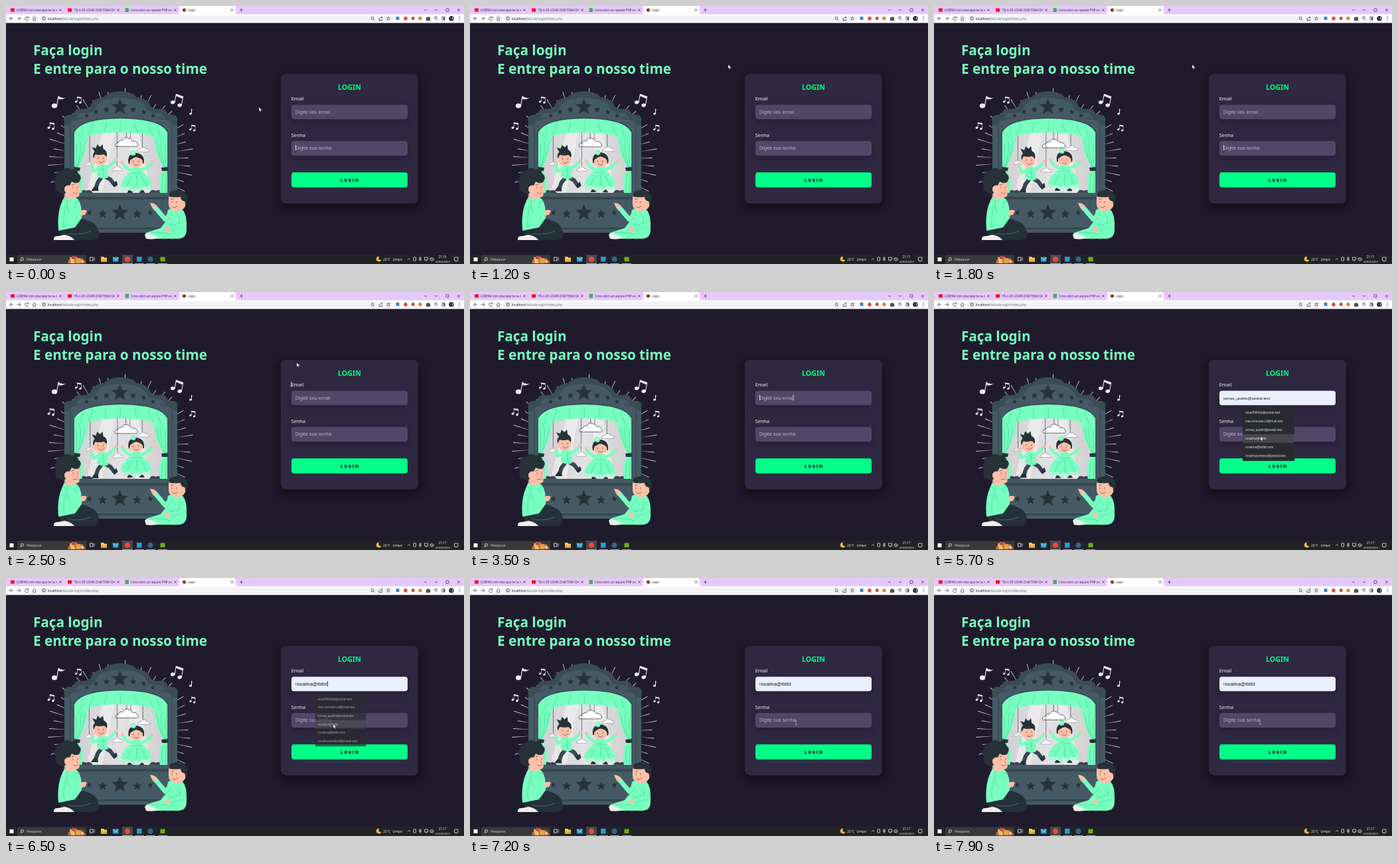
An HTML page for the animation above (8000 ms loop, 690 by 388 pixels).

```html
<!DOCTYPE html>
<html lang="pt">
<meta charset="utf-8">
<title>Login</title>
<style>
html, body { margin: 0; width: 100%; height: 100%; overflow: hidden; background: #201b2c }
svg { display: block; width: 690px; height: 388px }
text { font-family: "Noto Sans", "Open Sans", sans-serif }
.ui { font: 5px "Open Sans", "Noto Sans", sans-serif }
.tab { font: 4.5px Roboto, sans-serif; fill: #3f3547 }
.tab text { font-family: Roboto, sans-serif }
.field { font: 7.35px "Liberation Sans", Arial, sans-serif; fill: #b5aec4 }
.line { fill: none; stroke: #50535a; stroke-width: .9 }
.mint { fill: #77ffc0 } .slate { fill: #455a64 } .dark { fill: #263238 } .shade { fill: #37474f }
.skin { fill: #ffbfa8 } .pale { fill: #eee }
.fold { fill: none; stroke: #34c88b; stroke-width: .6; stroke-linecap: round }
.ink { fill: none; stroke: #263238; stroke-width: .6; stroke-linecap: round }
.limb { fill: none; stroke-linecap: round; stroke-linejoin: round }
</style>
<svg viewBox="0 0 690 388">
<defs>
  <path id="star" d="M0-10 2.6-3.6 9.5-3.1 4.2 1.4 5.9 8.1 0 4.4-5.9 8.1-4.2 1.4-9.5-3.1-2.6-3.6Z"/>
  <path id="cloud" d="M-16 5Q-19 0-12-1Q-11-5-6-4Q-2-11 4-7Q7-8 9-3Q15-4 17 1Q19 5 14 5Z" fill="#fff" stroke="#263238" stroke-width=".7"/>
  <g id="pair" fill="#eee"><ellipse cx="-6" cy="5" rx="3.3" ry="2.6" transform="rotate(-25 -6 5)"/><ellipse cx="5" cy="7.500" rx="3.3" ry="2.6" transform="rotate(-25 5 7.500)"/><path d="M-3.6 5V-8.500L8.300-6.500V8H7.300V-3L-2.600-5V5Z"/></g>
  <path id="x" d="M-1.7-1.7 1.7 1.7M1.7-1.7-1.7 1.7" class="line"/>
  <clipPath id="opening"><path d="M102 282V190Q112 169 172 168.500Q234 169 244 190V282Z"/></clipPath>
  <filter id="blur" x="-30%" y="-30%" width="160%" height="180%"><feGaussianBlur stdDeviation="6"/></filter>
  <linearGradient id="moonlight"><stop stop-color="#cfcfd1"/><stop offset=".5" stop-color="#e2e2e4"/><stop offset="1" stop-color="#cfcfd1"/></linearGradient>
</defs>
<rect width="690" height="388" fill="#201b2c"/>

<!-- browser -->
<rect width="690" height="13" fill="#e5c9fa"/>
<path d="M258 12.500Q261 12 261 9V3Q261 0 264 0H343Q346 0 346 3V9Q346 12 349 12.500H690V25.500H0V12.500Z" fill="#fff"/>
<rect x="50" y="14.200" width="533" height="9.300" rx="4.600" fill="#f1f3f4"/>
<g class="ui">
  <g class="tab"><text x="16" y="7.700">LORENA mim desculpe ter te vin</text><text x="102" y="7.700">TELA DE LOGIN COM TEMA DAY</text><text x="188" y="7.700">Como abrir um arquivo PHP no v</text><text x="274" y="7.700">Login</text></g>
  <path d="M77 0H86V12H77ZM164.500 0H174V12H164.500ZM251 0H258V12H251Z" fill="#e5c9fa"/>
  <text x="63" y="20.600" fill="#202124" font-size="4.900">localhost<tspan fill="#70757a">/tela-de-login/index.php</tspan></text>
</g>
<rect x="7" y="3.500" width="6" height="5" fill="#f01414"/><rect x="93" y="3.500" width="6" height="5" fill="#f01414"/>
<rect x="179.500" y="3" width="5.500" height="6" fill="#43b052"/><circle cx="268.500" cy="6" r="2.600" fill="#a62b2b"/>
<g id="closers"></g>
<path class="line" d="M352 6H357M354.500 3.500V8.500M630 5L632 7 634 5M646 6H650.500M663 4H667V8H663ZM680 4 684 8M684 4 680 8"/>
<path class="line" d="M11 18.800H5.500M8 16.200 5.400 18.800 8 21.400M16.500 18.800H22M19.400 16.200 22 18.800 19.400 21.400M33.500 17.300A2.700 2.700 0 1 0 33.800 20M33.800 16V18H31.600M39.700 18.800 42.700 16 45.700 18.800M40.800 18.500V21.500H44.600V18.500"/>
<circle cx="57" cy="18.700" r="2.500" class="line"/><path class="line" d="M57 18.300V20.300M57 17V17.600"/>
<path class="line" d="M553.500 20 555 21.500M562 18.500V21.500H566.500V19.500M563.500 19Q563.500 17 567 17M565.500 15.500 567 17 565.500 18.500M645 16.500H650M645 18.500H648M649 18V21.500M657 16.500H661V21H657Z"/>
<circle cx="552" cy="18.500" r="2" class="line"/><use href="#star" class="line" transform="translate(576 18.800) scale(.29)" style="stroke-width:2.500"/>
<rect x="587.500" y="16" width="5" height="5" fill="#4285d5"/><circle cx="602" cy="18.700" r="2.800" fill="#dd493b"/><rect x="611" y="16.300" width="4.500" height="4.500" fill="#a35d31"/><circle cx="624" cy="18.700" r="2.700" fill="#e88428"/>
<path d="M633 17H635Q636 14.500 637 17H639V19Q640.500 20 639 21V22H633ZM659 16.500H661V21H659Z" fill="#505357"/><circle cx="671" cy="18.700" r="3.800" fill="#303745"/><path d="M672 16Q675 18 672 21Z" fill="#9dbed9"/>
<g fill="#55585e"><circle cx="683" cy="16.500" r=".7"/><circle cx="683" cy="18.700" r=".7"/><circle cx="683" cy="20.900" r=".7"/></g>

<!-- headline and theatre -->
<g class="mint" font-size="20.700" font-weight="700"><text x="41" y="73.600">Faça login</text><text x="41" y="101.900">E entre para o nosso time</text></g>
<g id="rays" fill="#d9d9de"></g>
<g class="pale"><ellipse cx="73" cy="150" rx="4.200" ry="3.500"/><path d="M76 150 78.500 135Q84 140 90 137.500Q84 142 79 139.500L77 150.500Z"/><ellipse cx="278" cy="162" rx="2" ry="1.600"/><path d="M279 162V154L281 157 280 157V162Z"/></g>
<use href="#pair" transform="translate(109 141) scale(.56)"/><use href="#pair" transform="translate(258 141) rotate(10)"/>
<use href="#pair" transform="translate(68 180) scale(.6)"/><use href="#pair" transform="translate(281 183) scale(.52)"/>
<path class="slate" d="M88 283V173Q86 165 94 164L101 163Q104 153 116 155Q126 156 129 147Q134 138 148 137Q153 129 172 128.500Q191 129 196 137Q210 138 216 147Q219 156 229 155Q241 153 244 163L251 164Q260 165 258 173V283Z"/>
<path class="shade" d="M88 178Q86 166 94 164L101 163Q104 153 116 155Q126 156 129 147Q134 138 148 137Q153 129 172 128.500Q191 129 196 137Q210 138 216 147Q219 156 229 155Q241 153 244 163L251 164Q260 165 258 178L251 180Q249 171 236 171Q226 166 213 163Q203 143 172 142Q142 143 132 163Q119 166 109 171Q96 171 95 180Z" opacity=".75"/>
<path class="slate" d="M105 170Q108 158 122 161Q132 160 136 151Q143 139 172 138Q203 139 210 151Q214 160 224 161Q237 158 240 170Q216 163 172 163Q128 163 105 170Z"/>
<path d="M97 180V282M250 180V282" stroke="#37474f" stroke-width="1.500"/>
<g clip-path="url(#opening)">
  <rect x="102" y="168" width="142" height="114" fill="url(#moonlight)"/>
  <path d="M148 180 121 282H145L165 180ZM181 180 196 282H219L198 180Z" fill="#f4f4f4" opacity=".6"/>
  <g id="cloud0"><path d="M181 165V201M187 165V200" class="ink"/><use href="#cloud" transform="translate(181 207)"/></g>
  <g id="cloud1"><path d="M206 165V212" class="ink"/><use href="#cloud" transform="translate(207 216) scale(.54)"/></g>
  <g id="cloud2"><path d="M168 165V240" class="ink"/><use href="#cloud" transform="translate(168 246) scale(.48)"/></g>
  <g id="cloud3"><path d="M126 165V234" class="ink"/><use href="#cloud" transform="translate(126 237) scale(.38)"/></g>
  <g id="boy">
    <path class="limb" d="M145 257 138 266 135 275M148 257 157 262 163 270" stroke="#37474f" stroke-width="6"/>
    <path class="dark" d="M132 273H138L139 279H128ZM160 270 166 264 168 270 163 274Z"/>
    <path class="limb" d="M140 245 132 249 129 240M153 244 159 240 165 234" stroke="#77ffc0" stroke-width="4.500"/>
    <circle cx="128" cy="236" r="2.500" class="skin"/><circle cx="166" cy="232" r="2.600" class="skin"/>
    <path class="mint" d="M138 241Q146 238 153 241L154 259Q145 263 137 257Z"/>
    <path class="fold" d="M146 243 147 258M139 253 143 255"/>
    <ellipse cx="142.500" cy="231" rx="10" ry="9.500" class="skin"/>
    <path class="dark" d="M132 230Q130 223 134 220L130 213 136 215 138 209 142 213 146 209 147 216Q154 219 152 228L148 224Q140 226 135 224Z"/>
    <path class="ink" d="M139 229V231M147 229V231M140 235Q144 239 148 234"/>
  </g>
  <g id="girl">
    <path class="limb" d="M188 268V277M203 268V277" stroke="#ffbfa8" stroke-width="3"/><path class="dark" d="M184 276H190V280H182ZM201 276H206L209 280H201Z"/>
    <path class="limb" d="M190 247 181 242 176 235M203 246 213 242 220 235" stroke="#77ffc0" stroke-width="4.500"/>
    <circle cx="175" cy="233" r="2.500" class="skin"/><circle cx="221" cy="234" r="2.500" class="skin"/>
    <path class="mint" d="M190 242Q197 239 203 242L204 248Q217 254 219 272L212 276 207 273 202 278 196 275 189 278 184 273 177 276 172 271Q175 254 190 248Z"/>
    <path d="M173 270 178 274 184 271 189 276 196 273 202 276 207 271 212 274 218 270" fill="none" stroke="#eee" stroke-width="1.300"/>
    <path class="fold" d="M190 250H204M189 255 182 270M197 254V270M204 255 211 270"/>
    <path class="dark" d="M185 236Q182 222 196 220Q210 222 208 236Z"/>
    <ellipse cx="196.500" cy="234" rx="10" ry="8" class="skin"/>
    <path class="dark" d="M185 234Q184 220 196 220Q209 221 208 234Q205 228 196 226Q188 229 185 234Z"/>
    <path class="ink" d="M192 232V234M200 232V234M193 237Q197 241 200 237"/><circle cx="192" cy="220" r="4" class="mint"/><circle cx="192" cy="220" r="1.300" class="pale"/>
  </g>
  <path class="shade" d="M111 283Q113 274 121 278Q127 274 132 283ZM215 283Q218 274 226 278Q234 274 239 283Z"/>
  <path class="mint" d="M102 180H124Q124 223 107 244Q119 258 114 282H102ZM244 180H222Q222 223 239 244Q227 258 232 282H244Z"/>
  <path class="fold" d="M105 195Q109 222 104 243M112 198Q115 222 106 243M119 204Q116 228 107 243M104 250Q107 265 106 280M109 252Q112 264 111 280M241 195Q237 222 242 243M234 198Q231 222 240 243M227 204Q230 228 239 243M242 250Q239 265 240 280M237 252Q234 264 235 280"/>
  <path class="dark" d="M102 242 112 243 111 248H102ZM244 242 234 243 235 248H244Z"/>
  <path class="mint" d="M102 168H244V208Q232 206 222 196Q202 190 172 190Q142 190 124 196Q114 206 102 208Z"/>
  <path class="fold" d="M124 195Q130 184 130 176M148 190Q151 181 151 175M172 189V174M198 190Q194 181 194 175M222 195Q215 184 215 176M109 204Q115 194 116 182M237 204Q230 194 229 182"/>
</g>
<path d="M102 282V190Q112 169 172 168.500Q234 169 244 190V282" fill="none" stroke="#37474f" stroke-width="1.600"/>
<path class="slate" d="M87 281H259V289H256V333H260V341H88Z"/>
<path class="shade" d="M88 287H257V291H88ZM89 333H258V336H89Z"/>
<g id="stars" class="dark"></g>

<!-- spectators -->
<path d="M92 319Q114 318 125 323Q140 329 140 344Q140 352 126 352H85L80 334Z" fill="#253038"/>
<path d="M94 342Q116 345 128 338" stroke="#52636b" fill="none"/>
<path class="pale" d="M72 352Q71 345 79 346L88 344Q99 346 103 352Z"/>
<path class="mint" d="M88 287Q98 284 107 289Q115 298 114 319L104 333 79 338Q76 307 88 287Z"/>
<path class="fold" d="M93 292Q88 309 101 317L117 313M90 302Q85 321 88 333M107 292Q103 299 105 303"/>
<path class="limb" d="M99 317 113 312" stroke="#77ffc0" stroke-width="7"/><path class="skin" d="M112 308Q119 305 122 308L119 314 113 315Z"/>
<path class="skin" d="M87 266Q101 254 110 263L112 275 110 286Q105 289 101 288L100 292 89 289Z"/>
<path class="dark" d="M82 282Q72 278 75 270Q70 263 76 257Q75 248 85 248Q90 240 98 246Q107 243 109 252Q116 257 110 265Q105 268 99 264L96 270Q91 268 88 274L90 281Q86 285 82 282Z"/>
<ellipse cx="91" cy="276" rx="3" ry="4" class="skin"/><path class="ink" d="M101 272V274M108 271V273M106 276 108 278M101 281Q105 284 108 281M99 269 103 268"/>
<path class="mint" d="M244 307Q251 301 262 304Q273 308 272 334Q273 350 259 350H215Q207 348 211 341L233 334 240 325Z"/>
<path class="limb" d="M248 313 240 321 224 302" stroke="#77ffc0" stroke-width="7"/>
<path class="skin" d="M217 296 223 297 228 303 222 306 219 301Z"/>
<path class="fold" d="M250 313 241 326M262 316Q266 326 253 334L238 338M214 343Q232 337 247 344M245 327 252 332"/>
<path class="limb" d="M265 316 266 329 246 335" stroke="#77ffc0" stroke-width="7"/><path class="skin" d="M239 334 246 331 247 338 239 339Z"/><path class="fold" d="M261 316 262 326 247 331M248 338 267 333"/>
<path class="pale" d="M209 344Q214 339 221 344L231 349Q220 352 211 350Z"/>
<path class="skin" d="M245 288Q249 279 263 280Q275 284 271 297Q270 307 258 309Q245 307 245 298Z"/>
<path class="dark" d="M247 287Q243 280 252 278Q263 274 270 281Q277 290 271 300L267 293Q264 293 263 287Q255 288 247 287Z"/>
<ellipse cx="267" cy="297" rx="3" ry="3.800" class="skin"/><path class="ink" d="M250 294V296M257 294V296M251 302Q255 305 258 301M249 291 252 290"/>

<!-- card -->
<rect x="411" y="104" width="214" height="202" rx="10" filter="url(#blur)" opacity=".42"/>
<rect x="414" y="102" width="207" height="195" rx="8" fill="#2f2841"/>
<g filter="url(#blur)" opacity=".25"><rect x="430" y="153" width="175" height="21"/><rect x="430" y="207" width="175" height="21"/><rect x="434" y="255" width="167" height="20" fill="#00ff88" opacity=".35"/></g>
<text x="517.500" y="126.100" text-anchor="middle" fill="#00ff88" font-size="10.700" font-weight="700">LOGIN</text>
<g fill="#f0f6f8" font-size="7.300"><text x="429.800" y="142">Email</text><text x="429.800" y="196.500">Senha</text></g>
<rect id="input" x="430" y="148.400" width="175" height="21.800" rx="4" fill="#514869"/><rect x="430" y="203" width="175" height="22" rx="4" fill="#514869"/>
<text id="value" class="field" x="436" y="161.700">Digite seu email</text><text class="field" x="436" y="216.300">Digite sua senha</text>
<rect x="430" y="250.300" width="175" height="22.500" rx="4" fill="#00ff88"/>
<text x="518.600" y="264" text-anchor="middle" font-size="5.600" font-weight="900" letter-spacing="2.050" fill="#17122a" stroke="#17122a" stroke-width=".35">LOGIN</text>
<rect id="caret" width=".8" height="8" fill="#fff"/>
<g id="menu" class="ui"><rect x="465" y="173" width="78" height="81" rx="1" fill="#292a2d"/><rect id="hover" x="465" width="78" height="13" fill="#46474b"/><g id="options" fill="#e8eaed" font-size="4.600"></g></g>

<!-- taskbar -->
<rect y="374" width="690" height="14" fill="#212226"/><rect x="17" y="374.500" width="104" height="13.500" fill="#39393d"/>
<rect x="5.500" y="378" width="6" height="6" fill="#fff"/><circle cx="24.500" cy="380.500" r="2" class="line" style="stroke:#ddd"/><path d="M23 382 21.500 383.700" stroke="#ddd"/>
<text x="31" y="383" class="ui" fill="#ddd" font-size="5.300">Pesquisar</text>
<path d="M93 387Q94 379 100 381Q104 372 109 380Q116 376 120 387Z" fill="#bd713f"/><path d="M96 378 101 377 104 387H98Z" fill="#ebc26c"/><circle cx="109" cy="383" r="4" fill="#e5a14f"/><circle cx="101" cy="378" r="2.500" fill="#c74c35"/><circle cx="115" cy="384" r="2" fill="#f0d58a"/>
<path class="line" style="stroke:#ddd" d="M126.500 378H131V383H126.500ZM133 378V383"/>
<path d="M143 377H147L148 378.500H152V384.500H143Z" fill="#f7cc55"/><path d="M143 381H152V384.500H143Z" fill="#e8ae32"/>
<rect x="161" y="377.500" width="8.500" height="7" fill="#2b9be3"/><path d="M161 378 165 382 169.500 378" fill="none" stroke="#dff3ff" stroke-width=".8"/>
<rect x="175" y="374" width="16" height="14" fill="#47484d"/><circle cx="183" cy="380.700" r="4" fill="#e34d3e"/><rect x="197" y="377" width="7.500" height="7.500" fill="#2298e6"/><circle cx="217.500" cy="380.700" r="4" fill="#2d6598"/><rect x="232.500" y="377.500" width="7" height="6.500" fill="#6cae15"/>
<path d="M175 387.500H191M194 387.500H208M211 387.500H225M229 387.500H243" stroke="#76b9ed"/>
<path d="M562 376.500A4 4 0 1 0 565.500 382Q560 382 562 376.500" fill="#f1b545"/>
<g class="ui" fill="#eee" font-size="5.100"><text x="568" y="382.700">22°C</text><text x="582.500" y="382.700">Limpo</text><g text-anchor="middle" font-size="4.500"><text id="clock" x="657.500" y="379">21:16</text><text x="658" y="386" font-size="4.200">26/04/2023</text></g></g>
<path class="line" style="stroke:#e2e2e2;stroke-width:.8" d="M605 381.500 607 379.500 609 381.500M614 378H617.500V383H614ZM623 378H625V381H623ZM622 381Q624 384 626 381M624 383V384M630.500 378H635.500V382H630.500ZM633 382V384M639 379.500H640L642 378V383.500L640 382H639ZM643.500 379Q645 381 643.500 383M675.500 378H681V383H679L678 384.500V383H675.500Z"/>

<g id="pointer"><path id="arrow" d="M0 0V6.600L1.600 5.200 2.700 7.500 3.700 7 2.700 4.800H4.800Z" fill="#fff" stroke="#111" stroke-width=".45"/><path id="beam" d="M-1.500-3.500H-.4L0-3 .4-3.500H1.500M0-3V3M-1.500 3.500H-.4L0 3 .4 3.500H1.500" fill="none" stroke="#c8c8d0" stroke-width=".6"/></g>
</svg>
<script>
const $ = id => document.getElementById(id);
const set = (id, attrs) => { for (const k in attrs) $(id).setAttribute(k, attrs[k]); };
const show = (id, on) => { $(id).style.display = on ? "" : "none"; };
const LOOP = 8000;
const emails = ["nina456feliz@postal.test", "ines.morvale.cd@mail.test", "tomas_quelin@postal.test",
  "rosalina@tbtbt", "rosalina@tbtbt.com", "rosalinacardoso@postal.test"];
const path = [[0, 381, 152], [300, 381, 152], [900, 389, 88], [2000, 389, 88], [2500, 438, 106], [2900, 444, 112],
  [3500, 487, 159], [4900, 487, 159], [5400, 490, 203], [5550, 491, 209], [5700, 492, 217], [5900, 493, 219.500],
  [6900, 493, 219.500], [7300, 491, 217], [LOOP, 491, 217]];

const use = (href, x, y, s = 1) => `<use href="#${href}" transform="translate(${x} ${y}) scale(${s})"/>`;
$("closers").innerHTML = [82, 169, 255, 340.500].map(x => use("x", x, 6)).join("");
$("stars").innerHTML = use("star", 171.500, 152, 1.300) + use("star", 171.500, 311, 1.300) +
  [[20, 156, .5], [36, 159, .43], [50, 165, .38], [26, 313, .7], [46, 311, .45]]
    .map(([d, y, s]) => use("star", 171.500 - d, y, s) + use("star", 171.500 + d, y, s)).join("");

let rays = "";
for (let i = 0; i <= 34; i++) {
  const a = (-205 + i * 7) * Math.PI / 180, r = 106 + 5 * Math.sin(i * 2.300), w = .0045;
  const at = (r, a) => `${172 + r * Math.cos(a)} ${232 + r * .98 * Math.sin(a)}`;
  rays += `M${at(78, a)}L${at(r, a - w)} ${at(r, a + w)}Z`;
}
$("rays").innerHTML = `<path d="${rays}"/>`;
$("options").innerHTML = emails.map((e, i) => `<text x="469" y="${183.200 + i * 12.900}">${e}</text>`).join("");

function pointerAt(t) {
  const i = Math.max(1, path.findIndex(p => p[0] >= t));
  const [t0, x0, y0] = path[i - 1], [t1, x1, y1] = path[i];
  const u = (t - t0) / (t1 - t0), e = u * u * (3 - 2 * u);
  return [x0 + (x1 - x0) * e, y0 + (y1 - y0) * e];
}

function caretAt(t) {
  const blink = from => (t - from) % 1060 < 530;
  if (t < 2200) return blink(-400) && [436, 209];
  if (t < 3500) return blink(2300) && [429.500, 135];
  if (t < 5500) return blink(3300) && [436, 155];
  if (t < 6400) return null;
  if (t < 7300) return blink(6400) && [484, 155];
  return blink(7300) && [436, 209];
}

function draw(now) {
  const t = now % LOOP, [x, y] = pointerAt(t);
  const wave = (phase, amp) => amp * Math.cos((t - 500 - phase) / 3000 * 2 * Math.PI);
  set("boy", { transform: `translate(0 ${wave(1500, 2)}) rotate(${wave(700, 1)} 143 245)` });
  set("girl", { transform: `translate(0 ${wave(0, 2)}) rotate(${wave(900, 1)} 197 250)` });
  for (let i = 0; i < 4; i++) set("cloud" + i, { transform: `translate(${wave(i * 600, .8)} ${wave(i % 2 * 1500 + 1500, 1.500)})` });

  set("pointer", { transform: `translate(${x} ${y})` });
  const beam = (t > 3350 && t < 5000) || t >= 6700;
  show("beam", beam);
  show("arrow", !beam);
  $("clock").textContent = t < 500 ? "21:16" : "21:17";

  const fade = t < 6400 ? 1 : Math.max(0, 1 - (t - 6400) / 300), s = .95 + .05 * fade;
  show("menu", t >= 3700 && fade > 0);
  set("menu", { opacity: fade, transform: `translate(504 213) scale(${s}) translate(-504 -213)` });
  const row = Math.floor((y - 175) / 12.900);
  show("hover", t >= 5450 && row >= 0);
  set("hover", { y: 175 + row * 12.900 });

  const filled = t >= 5500, preview = filled && t < 6400;
  $("value").textContent = !filled ? "Digite seu email" : emails[t < 5800 ? 2 : 3];
  $("value").style.fill = filled ? "#1d1d25" : "";
  $("value").style.fontSize = preview ? "6.1px" : "";
  set("input", { fill: filled ? "#e8f0fe" : "#514869" });

  const caret = caretAt(t);
  show("caret", caret);
  if (caret) set("caret", { x: caret[0], y: caret[1], fill: t >= 6400 && t < 7300 ? "#111" : "#fff" });
  requestAnimationFrame(draw);
}
requestAnimationFrame(draw);
</script>
</html>
```
